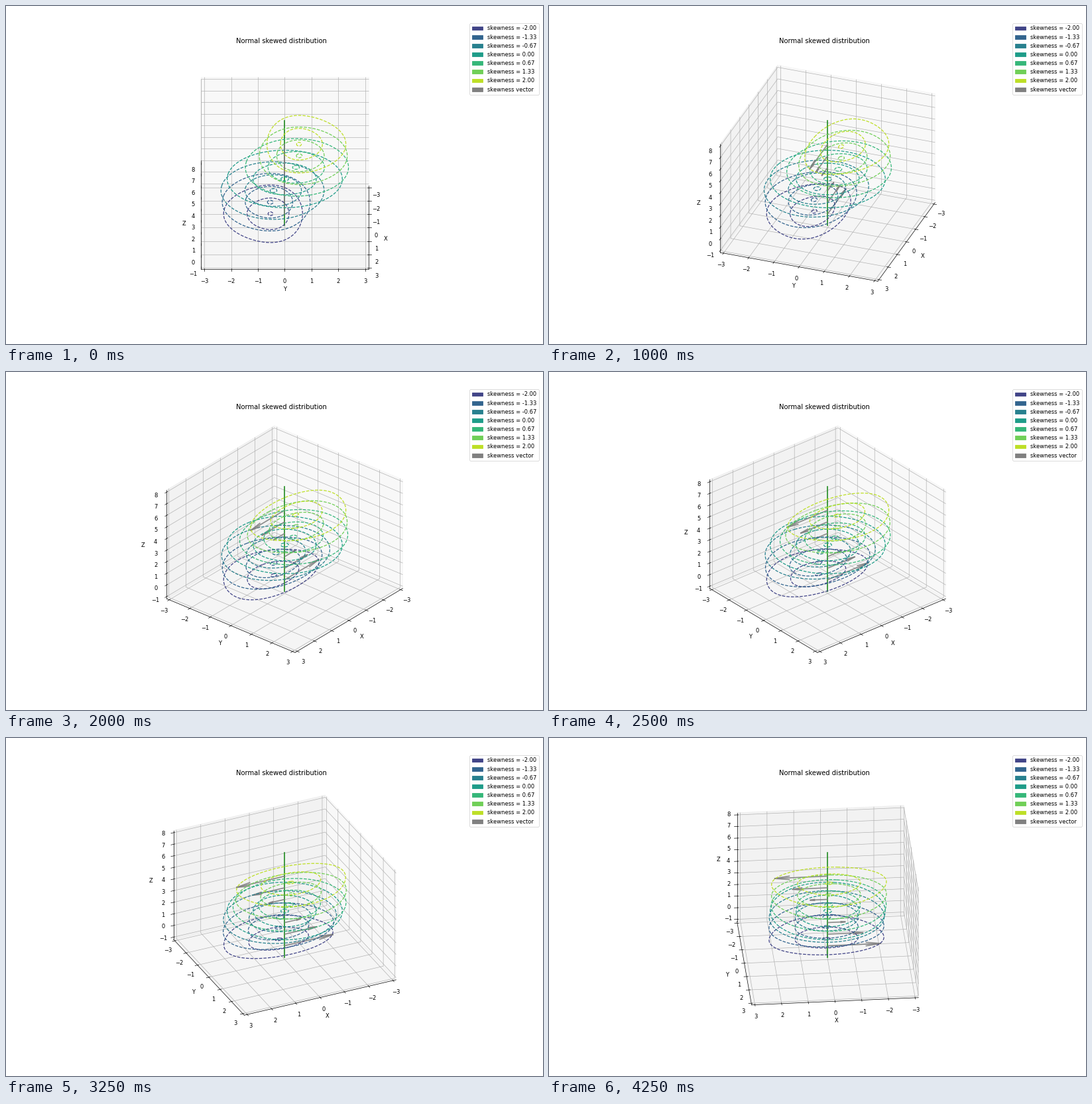
Animation of 810x510 px, one loop 4.5 s. Source, as a matplotlib script:

```python
import math

import numpy as np
import matplotlib.pyplot as plt
from matplotlib.animation import FuncAnimation
from matplotlib.patches import Patch

FRAMES, INTERVAL, TURN = 18, 250, 5
SKEWS = np.linspace(-2, 2, 7)
LEVELS = [0.1, 0.5, 0.99]
MARGIN = 1 / 48

erf = np.vectorize(math.erf)


def skewed_density(x, y, skew):
    """Bivariate normal skewed along y, scaled to a peak of one."""
    cdf = (1 + erf(skew * y / math.sqrt(2))) / 2
    density = np.exp(-(x**2 + y**2) / 2) * cdf
    return density / density.max()


def padded(low, high):
    pad = (high - low) * MARGIN
    return low - pad, high + pad


fig = plt.figure(figsize=(13.5, 8.5), dpi=60)
ax = fig.add_subplot(projection="3d", proj_type="ortho")
ax.set_title("Normal skewed distribution")

x, y = np.meshgrid(np.linspace(-3, 3, 100), np.linspace(-3, 3, 100))
colors = plt.cm.viridis(np.linspace(0.2, 0.9, len(SKEWS)))
handles = []
for height, (skew, color) in enumerate(zip(SKEWS, colors)):
    ax.contour(x, y, skewed_density(x, y, skew), LEVELS, offset=height,
               colors=[color], linestyles="dashed")
    if abs(skew) > 1e-9:
        ax.quiver(0, 0, height, skew, 0, 0, color="gray", alpha=0.9, linewidth=2)
    handles.append(Patch(color=color, label=f"skewness = {abs(skew) if abs(skew) < 1e-9 else skew:.2f}"))
handles.append(Patch(color="gray", label="skewness vector"))
ax.plot([0, 0], [0, 0], [-1, 8], color="forestgreen", linewidth=2)

ax.set(xlabel="X", ylabel="Y", zlabel="Z",
       xlim=padded(-3, 3), ylim=padded(-3, 3), zlim=padded(-1, 8),
       xticks=range(-3, 4), yticks=range(-3, 4), zticks=range(-1, 9))
ax.legend(handles=handles, loc="upper right", bbox_to_anchor=(1.5, 1.1))


def update(frame):
    ax.view_init(elev=30, azim=frame * TURN)
    return []


anim = FuncAnimation(fig, update, frames=FRAMES, interval=INTERVAL,
                     repeat=True, repeat_delay=0)
plt.show()
```
